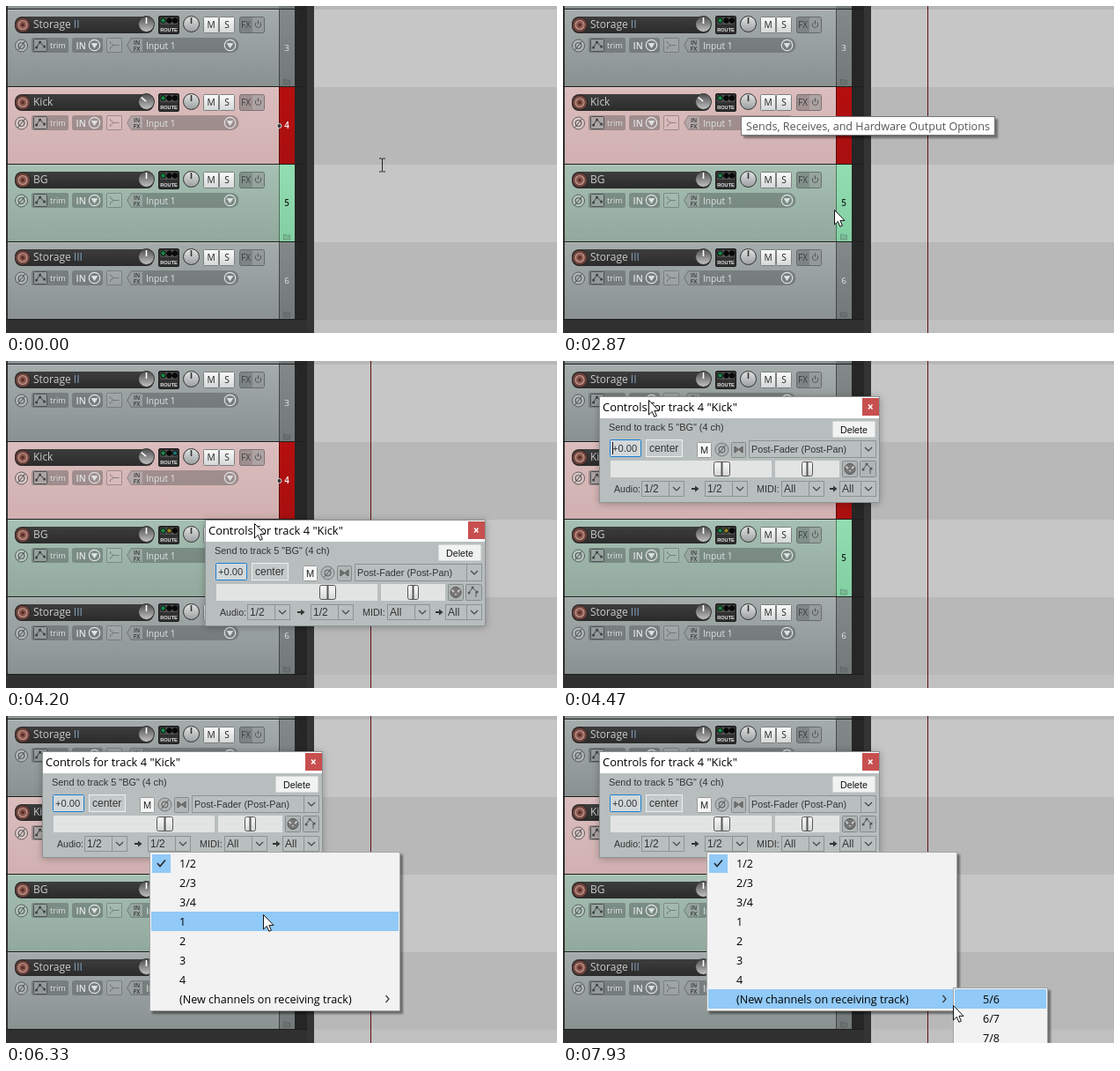
These frames come from a looping animation (626 by 371 pixels, 8000 ms). An HTML page:

```html
<!DOCTYPE html>
<html lang="en">
<head>
<meta charset="utf-8">
<title>Track routing</title>
<style>
html, body { margin: 0; width: 100%; height: 100%; overflow: hidden; background: #303030; }
svg { display: block; width: 626px; height: 371px; cursor: default; }
text { white-space: pre; }
.ui { font-family: "Open Sans", "Noto Sans", sans-serif; }
.form { font-family: "Liberation Sans", Arial, sans-serif; }
.mid { text-anchor: middle; }
</style>
</head>
<body>
<svg id="stage" viewBox="0 0 626 371" xmlns="http://www.w3.org/2000/svg"></svg>
<script>
const LOOP = 8000, FPS = 15;
const stage = document.getElementById('stage');

// ---- drawing helpers ----
const rect = (x, y, w, h, fill, more = '') =>
  `<rect x="${x}" y="${y}" width="${w}" height="${h}" fill="${fill}" ${more}/>`;
const frame = (x, y, w, h, fill, stroke, rx = 0) =>
  rect(x + .5, y + .5, w - 1, h - 1, fill, `stroke="${stroke}" rx="${rx}"`);
const circle = (x, y, r, fill, more = '') =>
  `<circle cx="${x}" cy="${y}" r="${r}" fill="${fill}" ${more}/>`;
const line = (d, stroke, width = 1, fill = 'none') =>
  `<path d="${d}" stroke="${stroke}" stroke-width="${width}" fill="${fill}"/>`;
const label = (x, y, size, fill, str, more = 'class="ui"') =>
  `<text x="${x}" y="${y}" font-size="${size}" fill="${fill}" ${more}>${str}</text>`;
const mid = (x, y, size, fill, str, more = '') =>
  label(x, y, size, fill, str, `class="ui mid" ${more}`);
const form = (x, y, size, str, fill = '#333') => label(x, y, size, fill, str, 'class="form"');
const group = (id, body) => `<g id="${id}">${body}</g>`;
const gradient = (id, a, b) =>
  `<linearGradient id="${id}" x1="0" y1="0" x2="0" y2="1"><stop stop-color="${a}"/><stop offset="1" stop-color="${b}"/></linearGradient>`;

// ---- track panels ----
const GRAY = { body: ['#a5acac', '#8a9191'], strip: ['#838989', '#737979'], ink: '#e8e8e8' };
const RED = { body: ['#dcbdbd', '#d0b0b0'], strip: ['#b50f0f', '#a90f0f'], ink: '#fff' };
const GREEN = { body: ['#a6c0b3', '#92a99d'], strip: ['#93ddb2', '#82cfa2'], ink: '#17241d' };
const tracks = [
  { name: 'Storage', count: 'II', no: 3, look: GRAY, turn: 0 },
  { name: 'Kick', count: '', no: 4, look: RED, turn: -50 },
  { name: 'BG', count: '', no: 5, look: GREEN, turn: 0 },
  { name: 'Storage', count: 'III', no: 6, look: GRAY, turn: 0 }
];

const dropRing = (x, y, ink) => circle(x, y, 6.2, 'none', `stroke="${ink}" stroke-width="1.2"`) +
  line(`M${x - 3.2} ${y - 2}h6.4l-3.2 5z`, ink, .8, ink);
const phase = (x, y, ink, r = 3.5) => circle(x, y, r, 'none', `stroke="${ink}"`) +
  line(`M${x - 4} ${y + 5}l8 -10`, ink);
const knob = (x, fill, ink, turn) => circle(x, 20.5, 9, fill, 'stroke="#333"') +
  `<path d="M${x} 20V13" stroke="${ink}" stroke-width="1.6" transform="rotate(${turn} ${x} 20.5)"/>`;
const envelope = (x, y, ink) =>
  line(`M${x} ${y + 8}l4 -6l5 5`, ink) +
  [[0, 8], [4, 2], [9, 7]].map(([a, b]) => rect(x + a - 1.2, y + b - 1.2, 2.6, 2.6, ink)).join('');

function track({ name, count, no, look, turn }, i) {
  const shade = 'rgba(55,60,60,.34)', pale = '#dfe3e3';
  const id = 'track' + no;
  return `<defs>${gradient(id, ...look.body)}${gradient(id + 's', ...look.strip)}</defs>
  <g transform="translate(0 ${i * 88})">` +
    rect(2, 4, 308, 87, `url(#${id})`) + rect(2, 4, 308, 1, 'rgba(255,255,255,.18)') +
    rect(310, 4, 18, 87, `url(#${id}s)`) + rect(310, 4, 1, 87, 'rgba(0,0,0,.45)') +
    rect(0, 91, 342, 1, '#1e1e1e') +
    rect(10, 12, 158, 19, 'url(#bar)', 'rx="8"') +
    circle(19, 21.5, 8.5, '#6d443e', 'stroke="#2e2422"') +
    circle(19, 21.5, 5, '#8c5a50', 'stroke="#c29a90" stroke-width="1.2"') + circle(19, 21.5, 2, '#5d2d28') +
    label(31, 25, 12, '#c9cccc', `${name}<tspan fill="#86a5c2">${count ? ' ' + count : ''}</tspan>`) +
    knob(159.5, 'url(#dial)', '#fff', turn) +
    frame(173, 11, 24, 21, '#303030', '#1c1c1c', 1.5) + rect(175, 13, 20, 8, '#505050', 'rx="2"') +
    circle(178.5, 16.5, 2.8, '#1a8548', 'stroke="#050505"') +
    circle(185.5, 16.5, 2.8, '#0a0a0a', `stroke="#050505" id="second${no}"`) +
    circle(192, 16.5, 2.8, '#0a0a0a', `stroke="#050505" id="third${no}"`) +
    label(185, 29, 5.6, '#e6e6e6', 'ROUTE', 'class="form mid" font-weight="bold"') +
    knob(210.5, 'url(#pan)', '#333', 0) +
    ['M', 'S'].map((c, k) => frame(224 + k * 18, 12, 18, 19, 'url(#key)', '#7c8080', 1) +
      mid(233 + k * 18, 25, 10.2, '#222', c, 'font-weight="500"')).join('') +
    frame(265, 12, 29, 19, 'rgba(80,86,86,.42)', 'rgba(60,64,64,.5)', 2) +
    rect(280, 13, 13, 17, 'rgba(215,220,220,.24)') +
    label(267, 25, 10, '#3b4040', 'FX') +
    line('M284.6 18.6a3.2 3.2 0 1 0 3.8 0M286.5 16.5v4', '#4d5353') +
    circle(17.5, 45, 7, 'rgba(235,238,238,.28)', 'stroke="rgba(70,74,74,.8)"') + phase(17.5, 45, '#454949') +
    rect(29, 36, 42, 17, shade, 'rx="2"') +
    frame(31, 37, 16, 15, 'rgba(200,206,206,.35)', '#4d5252', 1) + envelope(34.5, 39, '#3a3e3e') +
    label(50, 48, 9.2, pale, 'trim') +
    rect(75, 36, 35, 17, shade, 'rx="3"') + label(79.5, 48.5, 10.4, pale, 'IN', 'class="ui" font-weight="600"') +
    dropRing(100.5, 44.5, pale) +
    frame(114, 36, 18, 17, 'rgba(255,255,255,.06)', 'rgba(70,74,74,.4)', 1) +
    line('M118.5 40v2l4 2.5l-4 2.5v2M122.500 44.500h6', 'rgba(70,74,74,.5)') +
    `<path d="M137 44.5L142 36H256a8 8 0 0 1 0 17H142Z" fill="${shade}"/>` +
    `<path d="M138.500 44.500L142.500 37.500H155V51.500H142.500Z" fill="rgba(225,230,230,.3)"/>` +
    ['IN', 'FX'].map((s, k) => mid(148.5, 44 + 7 * k, 6.6, '#2f3434', s, 'font-weight="600"')).join('') +
    label(159, 48.5, 10.2, pale, 'Input 1') + dropRing(254.5, 44.5, pale) +
    mid(319, 51, 9.8, look.ink, no, look === GRAY ? '' : 'font-weight="600"') +
    (look === RED ? circle(310.5, 48, 2.5, '#333', 'stroke="#ddd"')
      : line('M315.5 83v6h7v-5h-4l-1 -1z', 'rgba(60,68,66,.3)', 1, 'rgba(60,68,66,.15)')) +
    '</g>';
}

// ---- routing window ----
const chevron = (x, y) => line(`M${x - 4} ${y - 2}l4 4l4 -4`, '#444', 1.2);
const select = (x, y, w, h, str, size) => frame(x, y, w, h, '#b9bfbf', '#8d9393') +
  rect(x + w - 18, y, 1, h, '#8d9393') + form(x + 3, y + h / 2 + 4, size, str) +
  chevron(x + w - 9, y + h / 2);
const arrow = (x, y) => line(`M${x - 4} ${y}h5`, '#333', 2) +
  `<path d="M${x} ${y - 3.5}l4.5 3.5l-4.5 3.5z" fill="#333"/>`;
const slider = (x, w, hx, hw) => rect(x, 73, w, 19, '#e2e4e4') +
  frame(hx, 74, hw, 17, 'url(#key)', '#555', 2) + rect(hx + hw / 2 - 1, 75, 2, 15, '#555');
const tool = (x, y, w, h) => frame(x, y, w, h, '#b0b6b6', '#858b8b', 1);

const panel =
  rect(-1, 0, 319, 121, '#b8bebe', 'filter="url(#soft)"') +
  rect(-1, 0, 319, 25, '#fff') + frame(-1, 0, 319, 121, 'none', '#8f9494') +
  label(3, 17, 12.9, '#000', 'Controls for track 4 "Kick"') +
  rect(298, 2, 19, 20, '#c74f4f') + line('M305 9.5l4.5 5M309.5 9.5l-4.5 5', '#fff', 1.4) +
  form(10, 39, 10.9, 'Send to track 5 "BG" (4 ch)') +
  frame(264, 28, 49, 19, '#f1f2f2', '#d5d8d8', 1) + form(273, 41.5, 10.7, 'Delete', '#111') +
  frame(11, 49, 36, 20, '#d2d8da', '#1a7fd4', 1) + form(14, 63, 11.2, '+0.00') +
  group('caret', rect(14, 52, 1, 14, '#111')) +
  frame(52, 49, 42, 20, '#c4caca', '#eef0f0') + form(56, 63, 12, 'center') +
  frame(110, 52, 17, 18, '#f4f5f5', '#999', 1) + label(118.5, 65, 11, '#222', 'M', 'class="form mid"') +
  circle(138.5, 60.5, 7.5, '#b0b6b6', 'stroke="#777"') + phase(138.5, 60.5, '#555') +
  tool(149, 52, 17, 18) + line('M153 57v7l4.5 -3.5l4.5 3.5v-7l-4.5 3.5z', '#555', 1, '#777') +
  select(169, 50, 145, 20, 'Post-Fader (Post-Pan)', 10.8) +
  slider(12, 183, 129, 19) + slider(199, 73, 229, 13) +
  tool(275, 73, 18, 19) + circle(284, 82.5, 6, '#777', 'stroke="#555"') +
  [-4, -2.8, 0, 2.8, 4].map(a => circle(284 + a, 84.6 - Math.abs(a) * 1.1, .9, '#e2e2e2')).join('') +
  tool(295, 73, 19, 19) + envelope(299, 75, '#555') + line('M307 82v6', '#555') +
  form(16, 109, 10.6, 'Audio:') + select(47, 96, 49, 18, '1/2', 12) + arrow(108, 105) +
  select(119, 96, 49, 18, '1/2', 12) + form(178, 109, 10.8, 'MIDI:') +
  select(206, 96, 49, 18, 'All', 12) + arrow(265, 105) + select(272, 96, 42, 18, 'All', 12);

// ---- menus ----
const MENU = { x: 163, y: 154, row: 22 };
const items = ['1/2', '2/3', '3/4', '1', '2', '3', '4', '(New channels on receiving track)'];
const list = (x, y, w, h, mark, entries) =>
  rect(x + 3, y + 3, w, h, 'rgba(0,0,0,.42)', 'filter="url(#thin)"') +
  frame(x, y, w, h, '#f2f2f2', '#a5a5a5') +
  rect(x + 2, y + 2, w - 4, MENU.row, '#91c9f7', `id="${mark}"`) +
  entries.map((s, i) => label(x + 34, y + 17.5 + i * MENU.row, 12.6, '#000', s)).join('');
const menu = list(MENU.x, MENU.y, 285, 181, 'rowMark', items) +
  rect(166, 157, 21, 21, '#91c9f7') + line('M172 167l3 3.5l6 -7', '#222', 1.5) +
  line('M431.5 317l3.5 4l-3.5 4', '#333', 1.2);
const submenu = list(443, 308, 108, 90, 'subMark', ['5/6', '6/7', '7/8']);

const tooltip = rect(205, 128, 289, 22, 'rgba(0,0,0,.4)', 'filter="url(#thin)"') +
  frame(202, 125, 289, 22, '#fff', '#777') +
  label(208, 140.5, 12.6, '#575757', 'Sends, Receives, and Hardware Output Options');

const rows = [[0, 4, '#b7b7b7'], [4, 88, '#c6c6c6'], [92, 88, '#b8b8b8'], [180, 88, '#c6c6c6'],
  [268, 88, '#b8b8b8'], [356, 15, '#c0c0c0']];

stage.innerHTML = `<defs>${gradient('bar', '#3d3d3d', '#2b2b2b')}${gradient('dial', '#4c4c4c', '#c4c4c4')}
  ${gradient('pan', '#e2e4e4', '#9a9e9e')}${gradient('key', '#fafafa', '#d4d7d7')}
  <filter id="soft" x="-10%" y="-20%" width="120%" height="140%"><feDropShadow dx="0" dy="1" stdDeviation="4.5" flood-opacity=".28"/></filter>
  <filter id="thin"><feGaussianBlur stdDeviation="1"/></filter></defs>` +
  rect(0, 0, 626, 371, '#303030') + rect(328, 0, 14, 356, '#262626') + rect(342, 0, 8, 371, '#343434') +
  rect(2, 0, 308, 3, '#8a9191') + rect(310, 0, 18, 3, '#737979') + rect(0, 3, 342, 1, '#1e1e1e') +
  rows.map(([y, h, c]) => rect(350, y, 276, h, c)).join('') +
  tracks.map(track).join('') +
  group('playhead', rect(414, 0, 1, 371, '#5c1010')) +
  group('tooltip', tooltip) + group('panel', panel) + group('menu', menu) + group('submenu', submenu) +
  group('beam', line('M-3.5 -7.5h3l.5 .5l.5 -.5h3M0 -7v14M-3.5 7.5h3l.5 -.5l.5 .5h3', '#222')) +
  group('pointer', '<path d="M.5 .5V17L4.3 13.4L6.8 19.3L9.4 18.2L6.9 12.4H12Z" fill="#fff" stroke="#111"/>');

// ---- motion: time, x, y ----
const mousePath = [
  [0, 427, 180], [200, 417, 156], [330, 417, 156], [1070, 187, 110], [2200, 187, 110],
  [2870, 308, 231], [3070, 280, 232], [3600, 280, 232], [3670, 296, 225], [3930, 343, 230],
  [4070, 343, 230], [4470, 97, 44], [4600, 97, 44], [5400, 188, 143], [5600, 188, 143],
  [6130, 293, 239], [6200, 293, 239], [6330, 292, 225], [6470, 296, 210], [7000, 365, 318],
  [7200, 365, 318], [7730, 498, 329], [7800, 498, 329], [7930, 443, 328], [8000, 443, 328]
];
const smooth = p => p * p * (3 - 2 * p);
const ramp = (t, a, b) => Math.min(1, Math.max(0, (t - a) / (b - a)));
function mouseAt(t) {
  const k = Math.max(1, mousePath.findIndex(p => p[0] >= t));
  const [t0, x0, y0] = mousePath[k - 1], [t1, x1, y1] = mousePath[k];
  const p = smooth(ramp(t, t0, t1));
  return [Math.round(x0 + (x1 - x0) * p), Math.round(y0 + (y1 - y0) * p)];
}

const el = id => document.getElementById(id);
const move = (id, x, y, scale = 1) => el(id).setAttribute('transform', `translate(${x} ${y}) scale(${scale})`);
const fade = (id, value) => {
  el(id).style.display = value > 0 ? '' : 'none';
  el(id).setAttribute('opacity', value);
};

function render(time) {
  // The screen refreshes at 15 frames a second, stamped in steps of 10 ms.
  const t = Math.round(Math.floor(time * FPS / 1000 + .1) * 100 / FPS) * 10 % LOOP;
  const [mx, my] = mouseAt(t);
  const overTimeline = t < 2000 && mx >= 350;
  fade('beam', +overTimeline);
  fade('pointer', +!overTimeline);
  move('beam', mx + .5, my + .5);
  move('pointer', mx, my);

  fade('playhead', +(t >= 400));
  fade('tooltip', t < 3200 ? ramp(t, 1270, 1530) : 0);
  const linked = t >= 3200;
  el('third4').setAttribute('fill', linked ? '#1f7070' : '#0a0a0a');
  el('second5').setAttribute('fill', linked ? '#8f8128' : '#0a0a0a');

  const shown = ramp(t, 3130, 3400), scale = .92 + .08 * smooth(shown);
  let px = 289, py = 226;
  if (t > 4070) [px, py] = t < 4470 ? [mx - 55, my - 4] : [42, 40];
  fade('panel', shown);
  move('panel', px + 158 * (1 - scale), py + 60 * (1 - scale), scale);
  fade('caret', +((t >= 3400 && t < 3930) || (t >= 4470 && t < 5000)));

  fade('menu', t < 5470 ? 0 : t < 5530 ? .88 : 1);
  const row = t >= 7000 ? 7 : Math.floor((my - MENU.y - 2) / MENU.row);
  fade('rowMark', +(t >= 5600 && row >= 0));
  el('rowMark').setAttribute('y', MENU.y + 2 + row * MENU.row);
  fade('submenu', ramp(t, 7330, 7470));
  fade('subMark', +(mx >= 443));
}

const start = performance.now();
function tick() {
  render((performance.now() - start) % LOOP);
  requestAnimationFrame(tick);
}
render(0);
tick();
</script>
</body>
</html>
```
